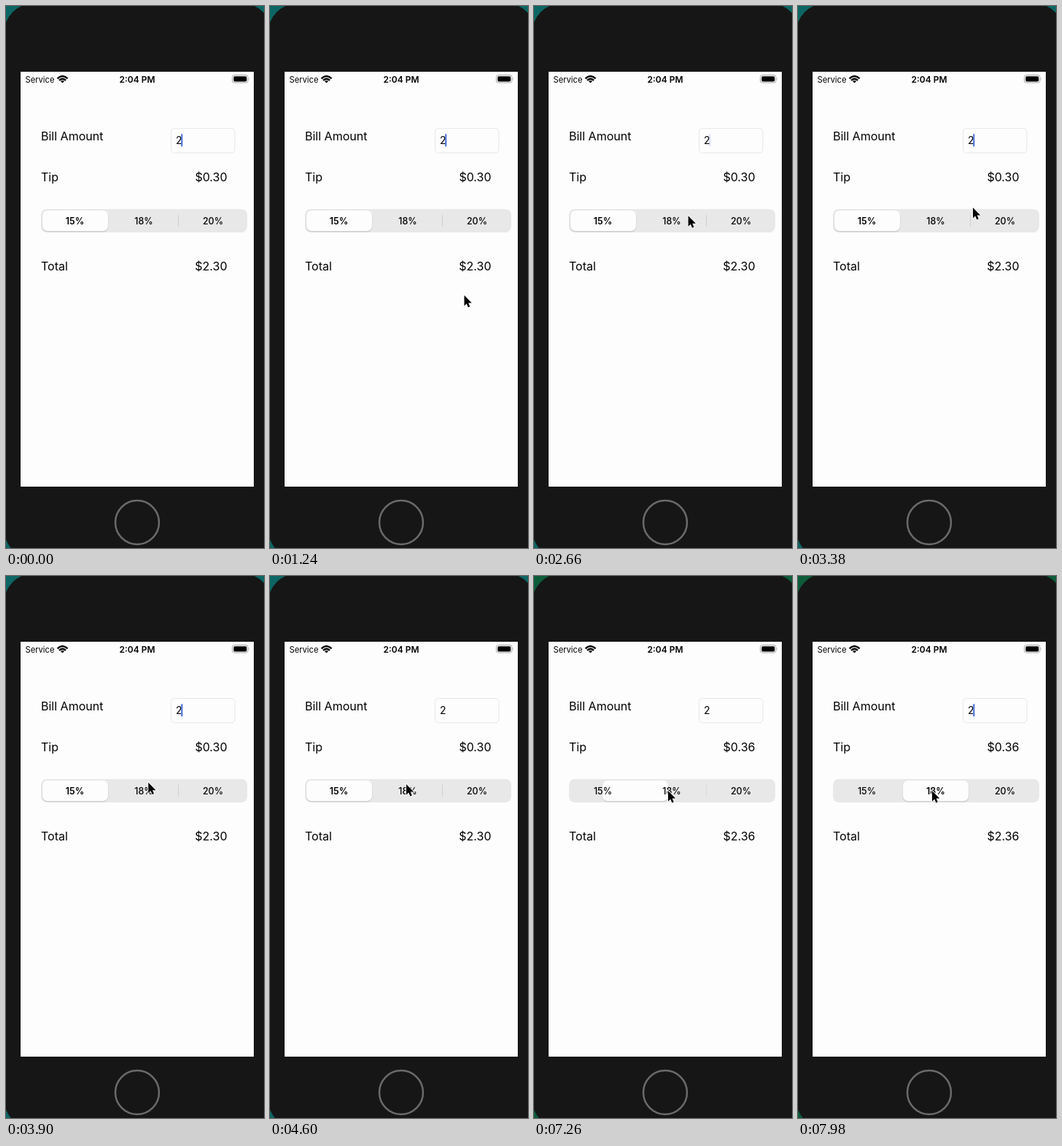
An HTML page for the animation above (8 s loop, 354x742 px).

```html
<!DOCTYPE html>
<html lang="en">
<head>
<meta charset="utf-8">
<title>Tip calculator</title>
<style>
  html, body { margin: 0; width: 100%; height: 100%; overflow: hidden; }
  svg { display: block; width: 100%; height: 100%; font-family: Inter, Roboto, sans-serif; font-size: 16px; }
  .small { font-size: 12px; }
  .segment { font-size: 12.5px; font-weight: 500; text-anchor: middle; }
  .end { text-anchor: end; }
</style>
</head>
<body>
<svg viewBox="0 0 354 742">
  <rect id="backdrop" width="354" height="742"/>
  <rect x="-3" y="-4" width="368" height="761" rx="42" fill="#161616"/>
  <circle cx="180" cy="707" r="30" fill="none" stroke="#6b6b6b" stroke-width="2.5"/>
  <rect x="20" y="90" width="320" height="568" fill="#fdfdfd"/>

  <!-- status bar -->
  <text class="small" x="26.5" y="104.5" style="font-size:11.2px">Service</text>
  <g fill="none" stroke="#000" stroke-width="2.3">
    <path d="M70.5 99.3Q77.5 92.7 84.5 99.3M73 101.8Q77.5 97.6 82 101.8"/>
    <path d="M77.5 105.6L75 103.1Q77.5 101.1 80 103.1Z" fill="#000" stroke="none"/>
  </g>
  <text class="small" x="180" y="104.5" text-anchor="middle" font-weight="600">2:04 PM</text>
  <rect x="310.5" y="94.5" width="21.5" height="10.5" rx="3" fill="none" stroke="#a6a6a6"/>
  <rect x="312.3" y="96.2" width="18" height="7.2" rx="1.6"/>
  <path d="M333.3 98v3.6q1.4-1.8 0-3.6" fill="#a6a6a6"/>

  <!-- form -->
  <text x="48" y="183.5">Bill Amount</text>
  <rect x="226.5" y="167.5" width="87.5" height="33.5" rx="5" fill="#fdfdfd" stroke="#e6e6e6"/>
  <text x="233" y="189" style="font-size:14px">2</text>
  <rect id="caret" x="240.3" y="175" width="2" height="17.5" rx="1" fill="#426bd8"/>
  <text x="48" y="239.5">Tip</text>
  <text id="tip" class="end" x="303.5" y="239.5"></text>

  <rect x="48" y="278" width="283" height="32" rx="8" fill="#e8e8e9"/>
  <rect id="divider" x="236" y="286" width="1" height="16" fill="#cfcfd2"/>
  <g id="pill">
    <rect x="49.5" y="281" width="91" height="28.5" rx="7.5" fill="#c8c8ca" opacity=".75"/>
    <rect x="50" y="280" width="90" height="28" rx="7" fill="#fdfdfd"/>
  </g>
  <text class="segment" x="94.5" y="298.5">15%</text>
  <text class="segment" x="189" y="298.5">18%</text>
  <text class="segment" x="284" y="298.5">20%</text>

  <text x="48" y="361.5">Total</text>
  <text id="total" class="end" x="303.5" y="361.5"></text>

  <path id="pointer" d="M0 0V14.5L3.3 11.4 5.4 16.4 7.8 15.4 5.7 10.5H10.3Z" stroke="#fff" stroke-width="1.6" paint-order="stroke"/>
</svg>
<script>
const LOOP = 8000, TAP = 6720, SLIDE = 1130, CARET_FADE = 380;
const bill = 2;
// start of the caret's fade-out, end of its fade-in
const caretBlinks = [[1400, 2960], [4200, 5760], [6720, 7960]];
// time, x, y of the pointer tip
const pointerPath = [
  [600, 358, 520], [1800, 192, 295], [2200, 192, 295], [3250, 240, 276],
  [3400, 240, 276], [4080, 186, 284], [4600, 187, 285], [4900, 184, 294],
  [LOOP, 184, 294]
];

const el = id => document.getElementById(id);
const clamp = v => Math.max(0, Math.min(1, v));
const smooth = v => v * v * (3 - 2 * v);
const segments = document.querySelectorAll('.segment');

function pointerAt(t) {
  const i = pointerPath.findIndex(key => key[0] > t);
  if (i < 1) return [-40, -40];
  const [t0, x0, y0] = pointerPath[i - 1], [t1, x1, y1] = pointerPath[i];
  const k = smooth((t - t0) / (t1 - t0));
  return [x0 + (x1 - x0) * k, y0 + (y1 - y0) * k];
}

function caretOpacity(t) {
  const levels = caretBlinks.map(([from, to]) => 1 - Math.min(t - from, to - t) / CARET_FADE);
  return clamp(Math.min(...levels));
}

function draw(t) {
  const slide = smooth(clamp((t - TAP) / SLIDE));
  const rate = t < TAP ? 0.15 : 0.18;

  el('backdrop').setAttribute('fill', t < TAP ? '#0c6664' : '#0c5c3a');
  el('caret').setAttribute('opacity', caretOpacity(t));
  el('tip').textContent = '$' + (bill * rate).toFixed(2);
  el('total').textContent = '$' + (bill * (1 + rate)).toFixed(2);
  el('pill').setAttribute('transform', `translate(${94 * slide})`);
  el('divider').setAttribute('opacity', 1 - slide);
  segments.forEach((s, i) => s.style.fontWeight = Math.abs(slide - i) < 0.3 ? 600 : 500);
  el('pointer').setAttribute('transform', `translate(${pointerAt(t)})`);
}

const start = performance.now();
function tick() {
  draw((performance.now() - start) % LOOP);
  requestAnimationFrame(tick);
}
tick();
</script>
</body>
</html>
```
